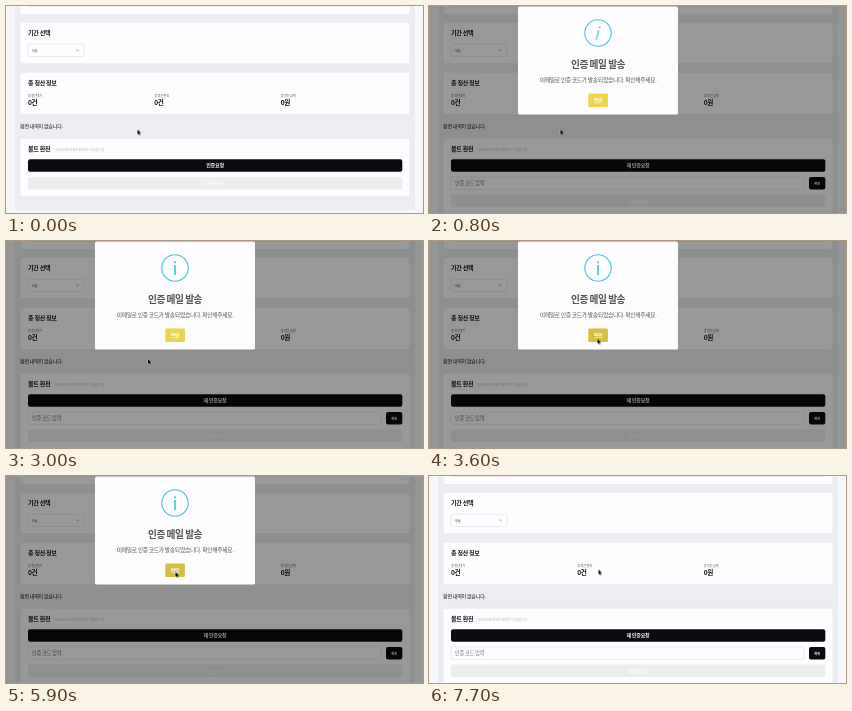
An HTML page that plays this animation: 417 px wide and 207 px high, repeating every 8 s.

```html
<!DOCTYPE html>
<html>
<head>
<meta charset="utf-8">
<title>정산</title>
<style>
  html, body { margin: 0; width: 100%; height: 100%; overflow: hidden; background: #f7f7fa; }
  svg { display: block; width: 417px; height: 207px; }
  text {
    font-family: "Noto Sans CJK KR", "Noto Sans CJK JP", "Noto Sans CJK SC", "Noto Sans CJK", sans-serif;
    letter-spacing: -.05em;
    fill: #17171b;
  }
  .card { fill: #fdfcfe; stroke: #e1e3e8; stroke-width: .5; }
  .field { fill: #fdfcfe; stroke: #dfe0e5; stroke-width: .6; }
  .dark { fill: #0c0b10; }
  .off { fill: #ededf0; }
  .h { font-size: 6.1px; font-weight: 700; }
  .num { font-size: 6.6px; font-weight: 700; }
  .label { font-size: 3.1px; fill: #55555a; }
  .note { font-size: 3.6px; fill: #b4b4b9; }
  .body { font-size: 5.1px; font-weight: 500; }
  .hint { font-size: 5.3px; fill: #77777c; }
  .mid { text-anchor: middle; }
  .btn { font-size: 5.05px; font-weight: 700; fill: #fff; text-anchor: middle; }
  .btn.small { font-size: 3.4px; }
  .btn.faint { fill: #fafafc; }
  .title { font-size: 9.7px; font-weight: 700; fill: #545454; }
  .msg { font-size: 5.77px; font-weight: 500; fill: #545454; }
  .mark { font: 18.4px Inter, "Open Sans", sans-serif; letter-spacing: 0; fill: #43c3da; }

  /* Everything advances in 100 ms ticks: 1.25% of the loop. */
  .before, .after, .modal, .popup, .icon, .mark, .ok, .cursor {
    animation: 8s step-end infinite;
  }
  .before { animation-name: before; }
  .after { animation-name: after; }
  .modal { animation-name: modal; }
  .popup { animation-name: pop; transform-origin: 169px 54.5px; }
  .icon { animation-name: flip; transform-origin: 169px 27px; }
  .mark { animation-name: wobble; transform-origin: 169px 27px; }
  .ok { animation-name: ok; fill: #ecd44c; }
  .cursor { animation-name: cursor; }

  @keyframes before { 0% { visibility: visible } 6.25%, 100% { visibility: hidden } }
  @keyframes after { 0% { visibility: hidden } 6.25%, 100% { visibility: visible } }
  @keyframes modal {
    0% { visibility: hidden }
    6.25% { visibility: visible }
    96.25%, 100% { visibility: hidden }
  }
  @keyframes pop {
    0% { transform: scale(1.01) }
    7.5% { transform: scale(.963) }
    8.75%, 100% { transform: none }
  }
  @keyframes flip {
    0% { transform: scale(1, .31); opacity: .28 }
    7.5% { transform: scale(1, .8); opacity: .63 }
    8.75% { transform: scale(1, .97); opacity: .86 }
    10% { transform: none; opacity: .96 }
    11.25%, 100% { transform: none; opacity: 1 }
  }
  @keyframes wobble {
    0% { transform: rotate(-9deg); opacity: .31 }
    7.5% { transform: rotate(-25deg); opacity: .4 }
    8.75% { transform: rotate(6deg); opacity: .71 }
    10% { transform: rotate(15deg); opacity: .8 }
    11.25% { transform: none; opacity: .95 }
    12.5% { transform: rotate(-5deg); opacity: 1 }
    13.75% { transform: rotate(-1deg); opacity: 1 }
    15%, 100% { transform: none; opacity: 1 }
  }
  @keyframes ok {
    0% { fill: #ecd44c }
    42.5% { fill: #d4bf44 }
    93.75%, 100% { fill: #bdaa3d }
  }
  @keyframes cursor {
    0% { transform: translate(131.5px, 123.5px) }
    37.5% { transform: translate(142px, 118px) }
    38.75% { transform: translate(150px, 112px) }
    40% { transform: translate(156px, 107px) }
    41.25% { transform: translate(161px, 103px) }
    42.5% { transform: translate(165px, 100px) }
    43.75% { transform: translate(167px, 98.5px) }
    45% { transform: translate(168.5px, 97.7px) }
    46.25% { transform: translate(169.3px, 97.3px) }
    50% { transform: translate(169.5px, 97px) }
    52.5% { transform: translate(169.5px, 96px) }
    88.75% { transform: translate(169.5px, 95px) }
    90%, 100% { transform: translate(169.5px, 93.5px) }
  }
</style>
</head>
<body>
<svg viewBox="0 0 417 207">
  <rect width="417" height="207" fill="#f7f7fa"/>
  <rect class="before" x="9" width="400" height="204" fill="#ecedf1"/>
  <rect class="after" x="9" width="400" height="207" fill="#ecedf1"/>

  <rect class="card" x="14" y="-10" width="390" height="18.5" rx="2"/>
  <path d="M22 .5H396" stroke="#f0e6ea" stroke-width=".8"/>

  <rect class="card" x="14" y="16.2" width="390" height="41.6" rx="2"/>
  <text class="h" x="22" y="29.3">기간 선택</text>
  <rect class="field" x="22" y="38.2" width="56" height="12.3" rx="1.3"/>
  <text class="label" x="26" y="45.5" style="fill:#222">오늘</text>
  <path d="M70 43.6l1.5 1.4 1.5-1.4" fill="none" stroke="#66666b" stroke-width=".5"/>

  <rect class="card" x="14" y="66.2" width="390" height="42.6" rx="2"/>
  <text class="h" x="22" y="78.8">총 정산 정보</text>
  <text class="label" x="22" y="90.6">총 정산대기</text>
  <text class="label" x="148.3" y="90.6">총 정산 완료</text>
  <text class="label" x="274.8" y="90.6">총 정산 금액</text>
  <text class="num" x="22" y="99.2">0건</text>
  <text class="num" x="148.3" y="99.2">0건</text>
  <text class="num" x="274.8" y="99.2">0원</text>

  <text class="body" x="14" y="122.4">환전 내역이 없습니다.</text>

  <rect class="card before" x="14" y="132.2" width="390" height="58.6" rx="2"/>
  <rect class="card after" x="14" y="132.2" width="390" height="76.2" rx="2"/>
  <text class="h" x="22" y="144.8">볼트 환전</text>
  <text class="note" x="47" y="144.6">* 10,000원 단위로 환전이 가능합니다.</text>
  <rect class="dark" x="22" y="153.3" width="374.3" height="12.5" rx="2"/>

  <g class="before">
    <text class="btn" x="209" y="161.4">인증요청</text>
    <rect class="off" x="22" y="171" width="374.3" height="12.5" rx="2"/>
    <text class="btn faint" x="209" y="179.1">환전하기</text>
  </g>
  <g class="after">
    <text class="btn" x="209" y="161.4">재 인증요청</text>
    <rect class="field" x="22" y="171" width="353.3" height="12.4" rx="1.3"/>
    <text class="hint" x="25.8" y="179.2">인증 코드 입력</text>
    <rect class="dark" x="380" y="170.9" width="16.3" height="12.6" rx="2"/>
    <text class="btn small" x="388.2" y="178.5">확인</text>
    <rect class="off" x="22" y="188.5" width="374.3" height="12.5" rx="2"/>
    <text class="btn faint" x="209" y="196.6">환전하기</text>
  </g>

  <g class="modal">
    <rect width="417" height="207" fill="#000" fill-opacity=".4"/>
    <g class="popup">
      <rect x="89" y=".6" width="160" height="108" rx="1.6" fill="#fdfcfe"/>
      <g class="icon">
        <circle cx="169" cy="27" r="13.2" fill="none" stroke="#43c3da" stroke-width="1.1"/>
        <text class="mark mid" x="169" y="33.8">i</text>
      </g>
      <text class="title mid" x="169" y="61.7">인증 메일 발송</text>
      <text class="msg mid" x="169.2" y="76.2">이메일로 인증 코드가 발송되었습니다. 확인해주세요.</text>
      <rect class="ok" x="159.3" y="87.5" width="19.6" height="13.6" rx="1.3"/>
      <text class="btn" x="169.1" y="96.3">확인</text>
    </g>
  </g>

  <path class="cursor" d="M0 0V5L1.1 4 1.9 5.8 2.8 5.4 2 3.7H3.5Z"
        fill="#000" stroke="#fff" stroke-width=".5" paint-order="stroke"/>
</svg>
</body>
</html>
```
